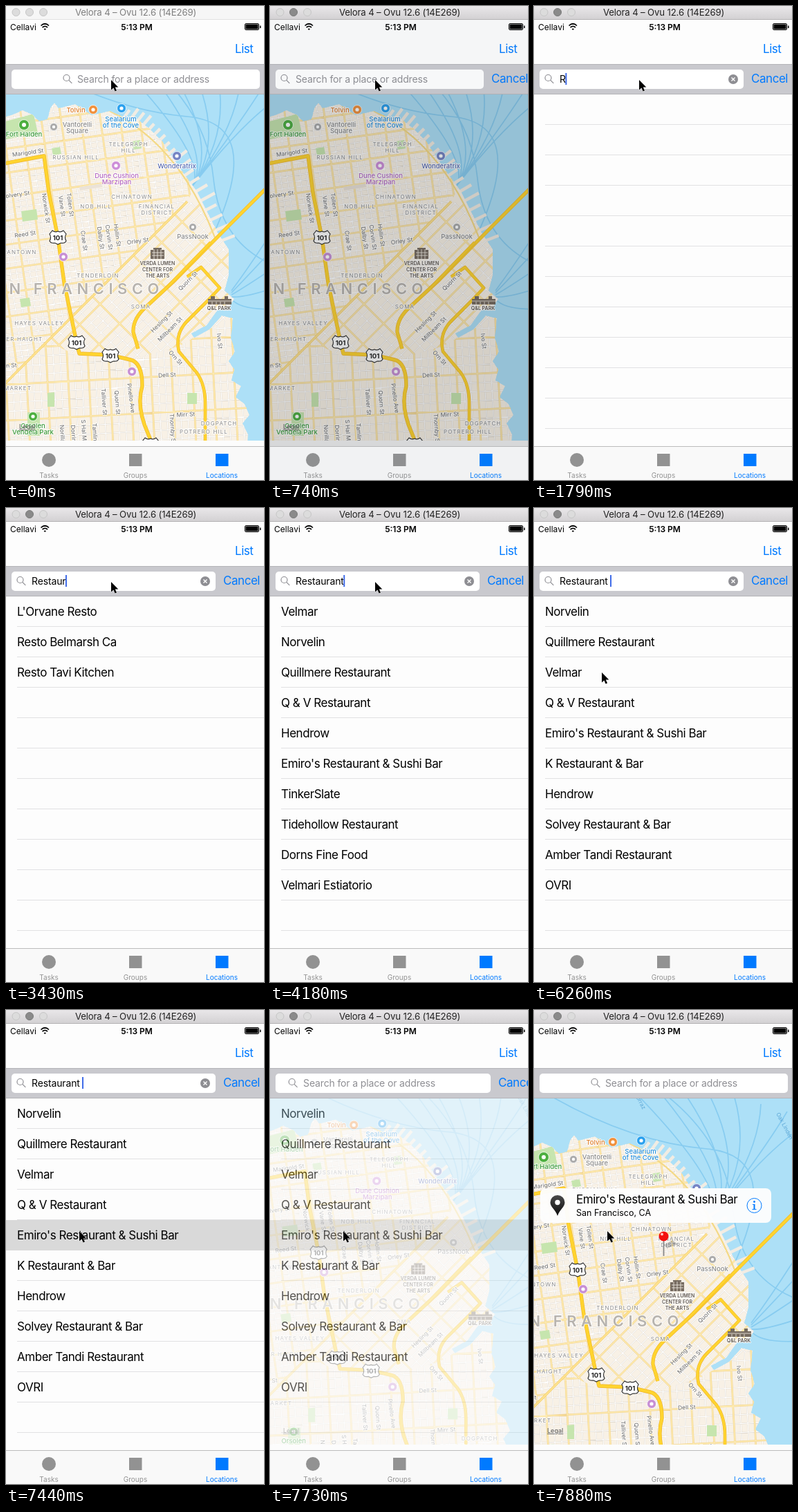
Write an HTML page that moves like this. It is 373x686 px and loops after 8 s.

```html
<!DOCTYPE html>
<html lang="en">
<head>
<meta charset="utf-8">
<title>Place search</title>
<style>
html, body { margin: 0; width: 100%; height: 100%; overflow: hidden; background: #fff; }
svg { display: block; width: 373px; height: 686px; }
text { font-family: Inter, "Open Sans", sans-serif; white-space: pre; }
.body { font-size: 17px; letter-spacing: -.46px; }
.field { font-size: 14px; letter-spacing: -.14px; }
.blue { fill: #007aff; }
.tab { font-size: 10px; text-anchor: middle; fill: #929292; }
.tab.blue { fill: #007aff; }
.map text { text-anchor: middle; paint-order: stroke; stroke: #fffc; stroke-width: 2px; stroke-linejoin: round; }
.area { font-size: 8px; letter-spacing: 1.1px; fill: #8a8a8a; }
.city { font-size: 22px; letter-spacing: 6.5px; font-weight: 600; fill: #b7b3ae; }
.street { font-size: 8.4px; fill: #666; }
.poi { font-size: 9.5px; font-weight: 500; }
.small { font-size: 7px; font-weight: 600; fill: #5e564e; }
.ferry { font-size: 8px; fill: #5aa6d6; }
.map .ferry { stroke: none; }
.shield { font-size: 9.5px; font-weight: 700; fill: #222; }
</style>
</head>
<body>
<svg viewBox="0 0 373 686" xmlns="http://www.w3.org/2000/svg">
  <defs>
    <linearGradient id="chrome" x2="0" y2="1"><stop stop-color="#e9e7e9"/><stop offset="1" stop-color="#d2d0d2"/></linearGradient>
    <linearGradient id="ink" x2="0" y2="1"><stop stop-color="#4a4a4a"/><stop offset="1" stop-color="#0c0c0c"/></linearGradient>
    <clipPath id="frame"><path d="M0 127H373V629H0Z"/></clipPath>
    <clipPath id="land"><path id="shore" d="M-5 700V162L10 157 24 151 38 157 48 167 60 164 64 148 70 140 76 148 100 142 124 158 150 152 168 160 190 164 208 178 226 196 240 218 258 244 276 268 292 300 306 328 322 352 322 390 316 412 330 424 322 436 306 440 290 462 268 474 272 480 294 468 312 448 328 452 325 480 331 500 322 514 330 526 326 542 340 550 332 566 345 576 352 592 342 604 350 620 346 700Z"/></clipPath>
    <clipPath id="north"><path d="M-9 0H400L262 283-9 554Z"/></clipPath>
    <clipPath id="soma"><path d="M262 283 345 300V440L250 492 190 510 100 505 60 485Z"/></clipPath>
    <clipPath id="south"><path d="M-9 554 60 485 100 505 190 510 250 492 345 440H400V700H-9Z"/></clipPath>
  </defs>

  <rect width="373" height="686" fill="#fcfcfc"/>
  <g clip-path="url(#frame)">
    <g id="map" class="map"></g>
    <text x="19" y="612" font-size="9" font-weight="500" fill="#666" text-decoration="underline">Legal</text>
  </g>
  <rect id="dim" y="127" width="373" height="510"/>

  <g id="callout">
    <path d="M188 340 200 333 208 339 192 345Z" fill="#0003"/>
    <path d="M187.500 333V356" stroke="#888" stroke-width="1.800"/>
    <circle cx="187.500" cy="327.500" r="7" fill="#f3100f"/>
    <circle cx="185" cy="324.500" r="2" fill="#ffc4c0"/>
    <rect x="9" y="258" width="334" height="50" rx="8" fill="#fdfdfd" fill-opacity=".97"/>
    <path d="M34 298C31 289 23.500 285 23.500 278.500A10.500 10.500 0 0 1 44.500 278.500C44.500 285 37 289 34 298Z" fill="url(#ink)"/>
    <circle cx="34" cy="278.500" r="3.700" fill="#fff"/>
    <text class="body" x="61" y="280">Emiro's Restaurant &amp; Sushi Bar</text>
    <text x="61" y="298" font-size="12.500">San Francisco, CA</text>
    <g class="blue">
      <circle cx="318.500" cy="283" r="10.500" fill="none" stroke="#007aff"/>
      <circle cx="318.500" cy="277.500" r="1.400"/>
      <path d="M316 281H319.500V288H321.500V289H315.500V288H317.500V282H316Z"/>
    </g>
  </g>

  <g id="table">
    <rect y="127" width="373" height="510" fill="#fdfdfd"/>
    <path id="rules" stroke="#e1e1e3"/>
    <rect id="hit" y="304" width="373" height="44" fill="#d9d9d9"/>
    <g id="rows" class="body"></g>
  </g>

  <rect y="20" width="373" height="64" fill="#fdfdfd"/>
  <text x="6" y="34.500" font-size="12">Cellavi</text>
  <g fill="none" stroke="#000" stroke-width="1.700">
    <path d="M50.500 28.500Q56.300 23 62 28.500M52.600 31Q56.300 27.600 60 31"/>
    <path d="M54.700 33.200Q56.300 31.600 57.900 33.200L56.300 35Z" fill="#000" stroke="none"/>
  </g>
  <text x="189" y="34.500" font-size="12" font-weight="600" text-anchor="middle">5:13 PM</text>
  <rect x="345.500" y="25.500" width="20" height="9" rx="1.500" fill="#fff" stroke="#000"/>
  <path d="M346.500 26.500H364.500V33.500H346.500ZM367 28.500H368.500V32H367Z"/>
  <text class="body blue" x="331" y="68">List</text>

  <rect y="84" width="373" height="44" fill="#c9c9ce"/>
  <path d="M0 84.500H373M0 127.500H373" stroke="#b4b4b8"/>
  <rect id="box" x="8" y="92" height="28" rx="5" fill="#fff"/>
  <g id="lens" fill="none" stroke="#8e8e93" stroke-width="1.200"><circle cx="-1.500" cy="-1.500" r="4.500"/><path d="M1.800 1.800 6.300 6.300"/></g>
  <text id="hint" class="field" y="110.500" fill="#8e8e93">Search for a place or address</text>
  <text id="query" class="field" x="37" y="110.500"></text>
  <rect id="caret" y="97" width="2" height="17" fill="#3f6be8"/>
  <g id="clear"><circle cx="288" cy="106" r="7" fill="#8e8e93"/><path d="M285.500 103.500 290.500 108.500M290.500 103.500 285.500 108.500" stroke="#fff" stroke-width="1.400"/></g>
  <text id="cancel" class="body blue" y="111">Cancel</text>

  <rect y="637" width="373" height="49" fill="#f9f9f9"/>
  <path d="M0 637.500H373" stroke="#bcbcbc"/>
  <circle cx="62" cy="657" r="10" fill="#929292"/>
  <rect x="178" y="648" width="18.500" height="18" fill="#929292"/>
  <rect class="blue" x="303" y="648" width="18.500" height="18"/>
  <text class="tab" x="62" y="683">Tasks</text>
  <text class="tab" x="187" y="683">Groups</text>
  <text class="tab blue" x="312" y="683">Locations</text>
  <rect id="shade" y="20" width="373" height="666" fill="#41606c"/>

  <rect id="bar" width="373" height="20"/>
  <path id="edge" d="M0 19.500H373" stroke="#b5b3b5"/>
  <g fill="#dcdcdc" stroke="#c6c6c6"><circle cx="14.500" cy="9" r="5.500"/><circle id="mid" cx="34" cy="9" r="5.500"/><circle cx="54" cy="9" r="5.500"/></g>
  <text id="title" x="187.500" y="14" font-size="13.200" letter-spacing="-.15" text-anchor="middle">Velora 4 – Ovu 12.6 (14E269)</text>
  <path id="mouse" d="M0 0V14.500L3.400 11.400 5.600 16.600 8 15.600 5.800 10.600H10.300Z" stroke="#fff" stroke-width="1" paint-order="stroke"/>
</svg>

<script>
const $ = id => document.getElementById(id);
const set = (id, attrs) => { for (const k in attrs) $(id).setAttribute(k, attrs[k]); };
const lerp = (a, b, k) => a + (b - a) * k;
const rand = n => { const v = Math.sin(n * 127.1) * 43758.5; return v - Math.floor(v); };

// ---- map ----
const line = (d, color, w, extra = '') =>
  `<path d="${d}" fill="none" stroke="${color}" stroke-width="${w}" ${extra}/>`;
const fill = (d, color) => `<path d="${d}" fill="${color}"/>`;
const road = (d, w) => line(d, '#eeb42c', w + 1.2, 'stroke-linejoin="round"') +
  line(d, '#ffd42f', w, 'stroke-linejoin="round"');

function grid(clip, x, y, turn, dx, dy) {
  let minor = '', major = '';
  for (let i = -45; i <= 45; i++) {
    const v = `M${i * dx} -450V450`, h = `M-450 ${i * dy}H450`;
    i % 3 ? minor += v : major += v;
    i % 4 ? minor += h : major += h;
  }
  return `<g clip-path="url(#${clip})"><g transform="translate(${x} ${y}) rotate(${turn})">` +
    line(minor, '#e0d9ce', 1.9) + line(minor, '#fff', 1.1) +
    line(major, '#efcf88', 2.6) + line(major, '#feebb0', 1.6) + '</g></g>';
}

function piers() {
  let d = '';
  for (let i = 0; i < 19; i++) {
    const t = i / 18, u = 1 - t;
    const x = u * u * 172 + 2 * u * t * 244 + t * t * 312;
    const y = u * u * 162 + 2 * u * t * 198 + t * t * 338;
    const a = lerp(-1.05, -.3, t), n = 9 + 15 * rand(i + 1);
    d += `M${x - 4} ${y + 3}L${x + n * Math.cos(a)} ${y + n * Math.sin(a)}`;
  }
  return line(d, '#f1ece3', 4.5);
}

function ferries() {
  let d = '';
  for (let i = 0; i < 8; i++) {
    d += `M270 260Q${292 + i * 9} ${214 - i * 9} ${150 + i * 38} ${70 + i * i}`;
    if (i < 5) d += `M326 ${424 - i * 3}Q${340 + i * 5} ${442 - i * 19} 400 ${438 - i * 34}`;
  }
  d += 'M30 80Q150 150 262 160T300 330M200 80Q290 150 300 250T400 380';
  return line(d, '#7fc7ef', 1.7, 'opacity=".8"');
}

const label = (cls, x, y, text, turn = 0, color = '') =>
  `<text class="${cls}" transform="translate(${x} ${y}) rotate(${turn})" ${color && `fill="${color}"`}>` +
  text.replace(/&/g, '&amp;').split('|').map((s, i) => `<tspan x="0" y="${i * 9}">${s}</tspan>`).join('') + '</text>';
const area = (x, y, s) => label('area', x, y, s);
const street = (x, y, s, turn) => label('street', x, y, s, turn);
const spot = (x, y, r, color) => `<circle cx="${x}" cy="${y}" r="${r}" fill="${color}" stroke="#fff" stroke-width=".8"/>` +
  `<circle cx="${x}" cy="${y}" r="${r * .4}" fill="#fff"/>`;
const shield = (x, y) => `<g transform="translate(${x} ${y})"><path d="M-8-10Q-4-7 0-9Q4-7 8-10L12-5Q9 0 12 5Q10 9 4 8L0 10-4 8Q-10 9-12 5Q-9 0-12-5Z" fill="#fff" stroke="#333" stroke-width="1.200"/>` +
  label('shield', 0, 3.5, '101') + '</g>';

const green = '#3a9a3a', violet = '#b367c2', gray = '#8b8b8b', blue = '#2690dc', indigo = '#5a6cb4';
$('map').innerHTML = [
  fill('M-20 60H410V660H-20Z', '#ade0f7'), ferries(), piers(),
  '<g clip-path="url(#land)">',
  fill($('shore').getAttribute('d'), '#f8f1e6'),
  grid('north', 75, 335, -8, 9.4, 8.6),
  grid('soma', 194, 430, -45, 14, 10),
  grid('south', 150, 540, -3, 10, 13),
  fill('M-5 168 40 156 46 184-5 194ZM22 297 44 294 46 309 24 312ZM31 588H49V622H31ZM66 206 78 204 80 214 68 216ZM182 196 194 194 196 206 184 208ZM20 424 34 422 36 434 22 436ZM262 560H276V576H262ZM60 560 70 559V580H60Z', '#c6e5ae'),
  fill('M106 262 138 257 139 262 107 267Z', '#ebe3d8'),
  line('M262 283-9 554', '#f2cd6c', 3.4), line('M262 283-9 554', '#fee391', 2.2),
  line('M150 152Q250 200 302 335', '#f4d986', 2.2),
  '</g>',
  road('M400 240 322 318 245 396 204 434Q183 452 184 472L191 496', 4),
  road('M296 342 232 408M262 392 282 378 309 408 292 426 262 456Q244 474 250 500L276 531Q288 548 288 575V650', 3.4),
  road('M-8 229 55 217 62 270 75 335 84 400 102 487 106 503 150 505 180 512Q197 516 197 550 188 580 205 618L218 650', 4.2),
  label('city', 68, 417, 'SAN FRANCISCO').replace('class="city"', 'class="city" style="text-anchor:end" dx="160"'),
  area(177, 203, 'TELEGRAPH|HILL'), area(101, 222, 'RUSSIAN HILL'), area(182, 279, 'CHINATOWN'),
  area(130, 293, 'NOB HILL'), area(218, 293, 'FINANCIAL|DISTRICT'), area(133, 393, 'TENDERLOIN'),
  area(195, 438, 'SOMA'), area(48, 462, 'HAYES VALLEY'), area(16, 485, 'LOWER HAIGHT'),
  area(14, 359, 'JAPANTOWN'), area(17, 556, 'MARKET'), area(308, 607, 'DOGPATCH'), area(286, 619, 'POTRERO HILL'),
  street(32, 215, 'Marigold St', -8), street(14, 276, 'Colvery St', -8), street(28, 333, 'Reed St', -8),
  street(55, 293, 'Norwick St', 82), street(78, 290, 'Vane St', 82), street(90, 288, 'Tollen St', 82),
  street(110, 340, 'Crae St', 82), street(134, 336, 'Dalby St', 82), street(146, 335, 'Corvin St', 82),
  street(158, 332, 'Hollin St', 82), street(191, 343, 'Orley St', -8),
  street(265, 400, 'Quorn St', -45), street(227, 459, 'Hesling St', -45), street(239, 470, 'Millbeam St', -45),
  street(243, 511, 'Orn St', 48), street(306, 485, 'Ivo St', 84), street(233, 537, 'Dell St', -3),
  street(260, 594, 'Mirr St', -3), street(8, 523, 'n St', -4), street(139, 573, 'Talliver St', 86),
  street(158, 574, 'Quorn St', 86), street(178, 568, 'Pinello Ave', 82), street(238, 612, 'Thornby St', 86),
  street(79, 624, 'Norilla St', 86), street(95, 624, 'Dorrin St', 86), street(110, 618, 'S Hal Mor', 86), street(126, 622, 'Tamlin St', 86),
  label('ferry', 164, 94, 'Orraz', 62), label('ferry', 372, 128, 'Oak Linden', 62),
  spot(126, 150, 6.5, '#f0903c'), label('poi', 101, 154, 'Tolvin', 0, '#e07f2c'),
  spot(69, 175, 5.5, '#aaa'), label('poi', 103, 175, 'Vantorelli|Square', 0, gray),
  spot(167, 148, 6.5, '#2aa0ee'), label('poi', 166, 167, 'Sealarium|of the Cove', 0, blue),
  spot(26, 172, 7.5, '#4caf3f'), label('poi', 26, 189, 'Fort Halden', 0, green),
  spot(247, 217, 6.5, '#7484c4'), label('poi', 247, 235, 'Wonderatrix', 0, indigo),
  spot(159, 231, 6.5, '#cd8ed8'), label('poi', 160, 249, 'Dune Cushion|Marzipan', 0, violet),
  spot(270, 320, 5.5, '#aaa'), label('poi', 270, 337, 'PassNook', 0, gray),
  fill('M209 353H213V350H225V353H229V366H209Z', '#766b60'),
  line('M211 357H228M211 361H228M214 352V366M219 352V366M224 352V366', '#f8f3ea', .8),
  label('small', 219, 375, 'VERDA LUMEN|CENTER FOR|THE ARTS'),
  fill('M292 424H296V420H302V424H316V420H321V424H326V432H292Z', '#766b60'),
  line('M292 427H326M298 428V432M304 428V432M310 428V432M316 428V432', '#f8f3ea', .8),
  label('small', 308, 440, 'Q&L PARK'),
  spot(39, 594, 6.5, '#4caf3f'), label('poi', 39, 611, 'Orsolen|Vendela Park', 0, green),
  spot(83, 363, 6.5, '#c78fd4'), spot(182, 529, 6.5, '#c78fd4'),
  shield(75, 335), shield(102, 487), shield(151, 506), shield(209, 635)
].join('');

// ---- result list ----
const lists = [
  [],
  ["L'Orvane Resto", 'Resto Belmarsh Ca', 'Resto Tavi Kitchen'],
  ['Velmar', 'Norvelin', 'Quillmere Restaurant', 'Q & V Restaurant', 'Hendrow', "Emiro's Restaurant & Sushi Bar",
    'TinkerSlate', 'Tidehollow Restaurant', 'Dorns Fine Food', 'Velmari Estiatorio'],
  ['Norvelin', 'Quillmere Restaurant', 'Velmar', 'Q & V Restaurant', "Emiro's Restaurant & Sushi Bar",
    'K Restaurant & Bar', 'Hendrow', 'Solvey Restaurant & Bar', 'Amber Tandi Restaurant', 'OVRI']
];
let rules = '', rows = '';
for (let i = 0; i < 11; i++) {
  rules += `M16 ${171.5 + 44 * i}H373`;
  rows += `<text x="16" y="${156 + 44 * i}"></text>`;
}
set('rules', { d: rules });
$('rows').innerHTML = rows;

// ---- timeline: each step patches the state before it ----
const steps = [
  [0, { active: 0, open: 0, dim: 0, table: 0, q: '', caret: 0, x: 152, y: 107, list: 0, hit: 0, pan: 0, pin: 0 }],
  [290, { active: 1 }],
  [590, { open: .3, dim: .3 }],
  [740, { open: .906, dim: .9 }],
  [890, { open: 1, dim: 1, caret: 1 }],
  [1490, { q: 'R', table: .3 }],
  [1640, { table: .8, dim: .4 }],
  [1790, { table: 1, dim: 0 }],
  [2090, { q: 'Re' }],
  [2390, { q: 'Res' }],
  [2540, { q: 'Rest' }],
  [2840, { q: 'Resta' }],
  [2990, { list: 1 }],
  [3140, { q: 'Restau' }],
  [3430, { q: 'Restaur' }],
  [3730, { q: 'Restaura' }],
  [3880, { q: 'Restauran', list: 2 }],
  [4180, { q: 'Restaurant' }],
  [4320, { q: 'Restaurant ' }],
  [4770, { caret: .8 }],
  [4920, { caret: .4 }],
  [5070, { caret: 0, list: 3 }],
  [5370, { caret: 1 }],
  [5820, { x: 128, y: 160, caret: .5 }],
  [5970, { x: 98, y: 209, caret: 0 }],
  [6260, { x: 98, y: 238, caret: 1 }],
  [6410, { x: 100, y: 270 }],
  [6550, { x: 103, y: 298 }],
  [6700, { x: 105, y: 313, caret: .6 }],
  [6840, { x: 106, y: 319, caret: 0 }],
  [6990, { y: 320, caret: 1 }],
  [7290, { hit: 1 }],
  [7590, { table: .65, open: .75, caret: 0, q: '', pan: .4 }],
  [7740, { table: .1, open: .1, pan: .95 }],
  [7880, { table: 0, open: 0, hit: 0, pan: 1, pin: 1 }]
];
const states = [];
steps.forEach(([, patch], i) => states.push({ ...states[i - 1], ...patch }));

function draw(s) {
  set('bar', { fill: s.active ? 'url(#chrome)' : '#f6f6f6' });
  set('edge', { opacity: s.active ? 1 : .3 });
  set('mid', { fill: s.active ? '#8a8a8a' : '#dcdcdc', stroke: s.active ? '#7a7a7a' : '#c6c6c6' });
  set('title', { fill: s.active ? '#222' : '#7f7f7f' });
  set('map', { transform: `translate(${-12 * s.pan} ${41 * s.pan})` });
  set('dim', { opacity: .13 * s.dim });
  set('shade', { opacity: .05 * s.dim });
  set('callout', { opacity: s.pin });
  set('table', { opacity: s.table });
  set('hit', { opacity: s.hit });
  [...$('rows').children].forEach((row, i) => row.textContent = lists[s.list][i] || '');

  const slide = Math.min(1, s.open * 1.11);
  set('box', { width: 359 - 64 * s.open });
  set('lens', { transform: `translate(${lerp(89, 22, slide)} 105.5)` });
  set('hint', { x: lerp(103, 37, slide), opacity: s.q ? 0 : 1 });
  set('cancel', { x: lerp(378, 314, s.open) });
  set('clear', { opacity: s.q ? 1 : 0 });
  $('query').textContent = s.q;
  set('caret', { x: 36.5 + (s.q ? $('query').getComputedTextLength() : 0), opacity: s.caret });
  set('mouse', { transform: `translate(${s.x} ${s.y})` });
}

let shown = -1;
function tick() {
  const t = performance.now() % 8000;
  let i = steps.length - 1;
  while (steps[i][0] > t) i--;
  if (i !== shown) draw(states[shown = i]);
  requestAnimationFrame(tick);
}
tick();
</script>
</body>
</html>
```
